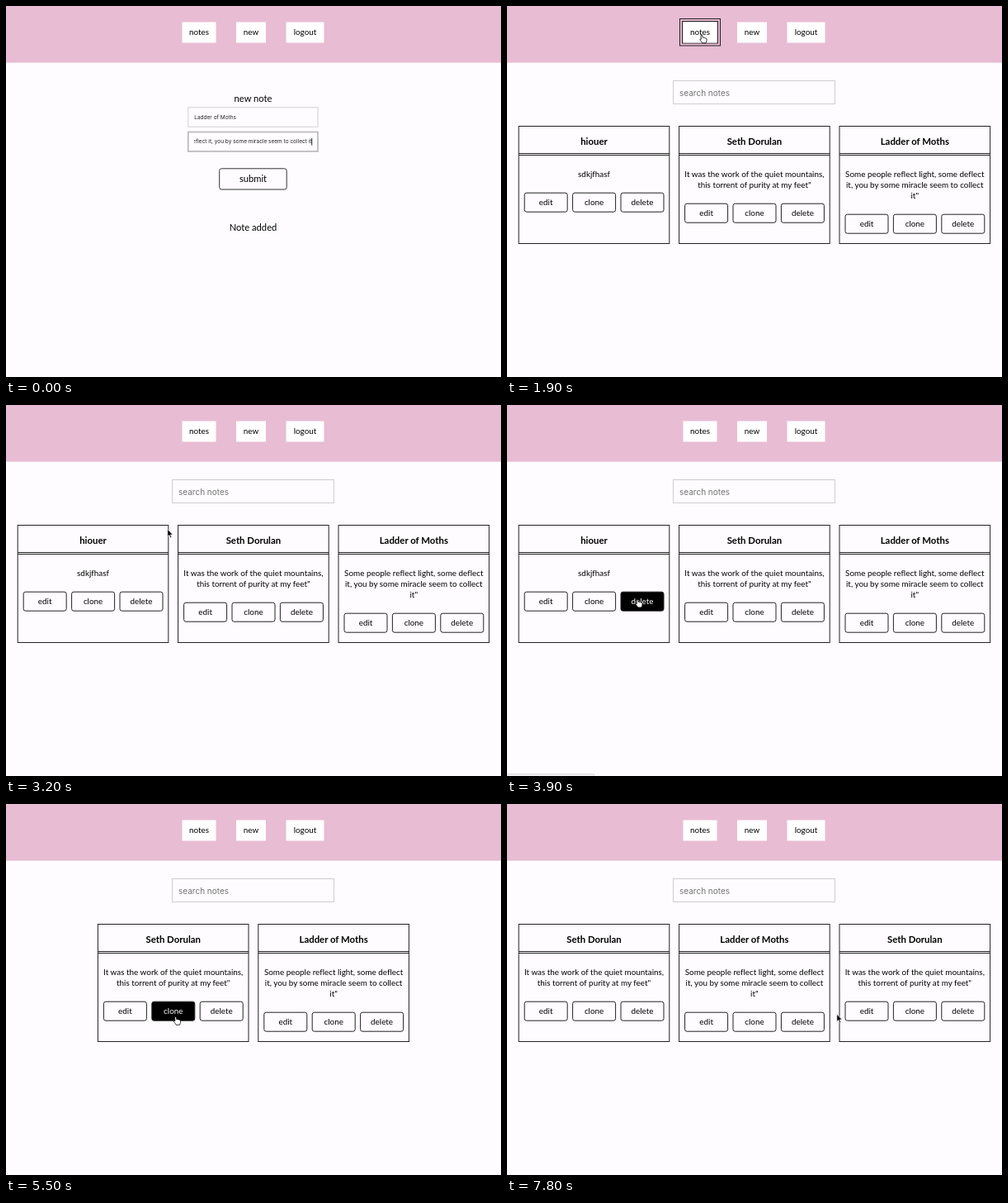
Recreate the animation shown at these times as an HTML page. Size 600 by 449 pixels, loop 8000 ms.

```html
<!DOCTYPE html>
<html lang="en">
<head>
<meta charset="utf-8">
<title>Notes</title>
<style>
  html, body { margin: 0; width: 100%; height: 100%; overflow: hidden; background: #fefcfe; }
  svg { display: block; width: 600px; height: 449px; }
  text { font: 9.9px Lato, "Open Sans", sans-serif; font-variant-ligatures: none; text-anchor: middle; fill: #000; }
  .big { font-size: 11.2px; }
  .title { font-size: 11.4px; font-weight: 700; }
  .field { font: 6.5px Inter, Roboto, sans-serif; text-anchor: start; fill: #222; }
  .end { text-anchor: end; }
  .hint { fill: #8a8a8e; }
  .search { font-size: 10px; fill: #757575; }
</style>
</head>
<body>
<svg id="stage" viewBox="0 0 600 449" xmlns="http://www.w3.org/2000/svg"></svg>
<script>
const LOOP = 8000, STEP = 100;
const stage = document.getElementById('stage');

function add(parent, tag, attrs = {}, content = '') {
  const el = document.createElementNS('http://www.w3.org/2000/svg', tag);
  for (const key in attrs) el.setAttribute(key, attrs[key]);
  el.textContent = content;
  parent.append(el);
  return el;
}
const group = parent => add(parent, 'g');
const label = (parent, x, y, content, cls = '') => add(parent, 'text', { x, y, class: cls }, content);
const box = (parent, x, y, width, height, stroke = 'none', fill = 'none', rx = 0) =>
  add(parent, 'rect', { x, y, width, height, stroke, fill, rx });
const show = (el, on) => { el.style.display = on ? '' : 'none'; };

// Header
box(stage, 0, 0, 600, 68.6, 'none', '#e8bcd3');
const ring = group(stage);
box(ring, 209.5, 15.5, 49, 32.5, '#222');
box(ring, 212.5, 18.5, 43, 26.5, '#222');
for (const [x, w, name] of [[213.5, 41, 'notes'], [279, 36, 'new'], [339.5, 46, 'logout']]) {
  box(stage, x, 19.5, w, 25, 'none', '#fff');
  label(stage, x + w / 2, 35.2, name);
}

// Form for a new note
const form = group(stage);
label(form, 299.5, 115.7, 'new note', 'big');
box(form, 220.8, 122.8, 157.2, 23.4, '#d2d0d4');
const plainEdge = box(form, 220.8, 152.5, 157.2, 23.4, '#d2d0d4');
const focusEdge = box(form, 220.8, 152.5, 157.2, 23.4, '#b9b9be');
focusEdge.setAttribute('stroke-width', 1.7);
box(form, 258.7, 196.8, 81.5, 25.2, '#333', 'none', 2.5);
label(form, 299.5, 213, 'submit', 'big');
label(form, 299.5, 271.5, 'Note added', 'big');

const clip = add(stage, 'clipPath', { id: 'inner' });
box(clip, 228, 155, 144, 18);
const filled = group(form);
label(filled, 228.3, 137, 'Ladder of Moths', 'field');
const typed = add(add(filled, 'g', { 'clip-path': 'url(#inner)' }), 'text',
  { x: 370.3, y: 166.4, class: 'field end' });
const hints = group(form);
label(hints, 228.3, 137, 'Title', 'field hint');
label(hints, 228.3, 166.4, 'Content', 'field hint');
const caret = box(form, 0, 160, 0.9, 8.6, 'none', '#111');

// List of notes
const list = group(stage);
box(list, 201.5, 90.5, 196, 28, '#cfcdd1');
label(list, 209, 108.5, 'search notes', 'field search');

const NOTES = {
  test: ['hiouer', 'sdkjfhasf'],
  quiet: ['Seth Dorulan', 'It was the work of the quiet mountains,', 'this torrent of purity at my feet"'],
  light: ['Ladder of Moths', 'Some people reflect light, some deflect', 'it, you by some miracle seem to collect', 'it"']
};

function button(parent, x, y, name) {
  const g = group(parent);
  const shape = box(g, x, y, 52, 23, '#222', 'none', 2.5);
  const text = label(g, x + 26, y + 14.8, name);
  return on => {
    shape.setAttribute('fill', on ? '#000' : 'none');
    text.style.fill = on ? '#fff' : '';
  };
}

function card(parent, x, [title, ...lines]) {
  const mid = x + 91.3;
  box(parent, x, 145.5, 182.6, 142, '#222');
  label(parent, mid, 168.3, title, 'title');
  for (const y of [178.5, 180.5])
    add(parent, 'path', { d: `M${x} ${y}h182.6`, stroke: '#222' });
  lines.forEach((line, i) => label(parent, mid, 206.8 + 13 * i, line));
  const y = 213.2 + 13 * lines.length;
  return ['edit', 'clone', 'delete'].map((name, i) => button(parent, x + 7 + 58.4 * i, y, name));
}

function board(names) {
  const g = group(list);
  const left = 300 - (names.length * 194.4 - 12) / 2;
  const buttons = names.map((name, i) => card(g, left + 194.4 * i - 0.2, NOTES[name]));
  return { g, buttons };
}
const first = board(['test', 'quiet', 'light']);
const second = board(['quiet', 'light']);
const third = board(['quiet', 'light', 'quiet']);

const status = group(stage);
box(status, -2, 446.6, 107.5, 6, '#dcdadd', '#f1eff1', 1);

// Pointer shapes, hot spot at 0,0
const pointers = {
  arrow: add(stage, 'path', {
    d: 'M0 0V9.2L2.1 7.3L3.5 10.6L5 9.9L3.6 6.8H6.5Z',
    fill: '#000', stroke: '#fff', 'stroke-width': 0.7
  }),
  hand: add(stage, 'path', {
    d: 'M-1 .6Q0-.5 .8 .6L1.3 3.2Q2.3 2.7 2.9 3.5Q3.9 3 4.5 3.8Q5.9 3.6 6 5V7.2L5 9.8H.7Q-.4 7.7-2.2 6Q-2.3 4.7-.6 5.2Z',
    fill: '#fff', stroke: '#000', 'stroke-width': 0.8
  }),
  beam: add(stage, 'path', {
    d: 'M-2-4.8Q0-4.8 0-3.8Q0-4.8 2-4.8M0-3.8V3.8M-2 4.8Q0 4.8 0 3.8Q0 4.8 2 4.8',
    fill: 'none', stroke: '#111', 'stroke-width': 0.8
  })
};

// time, x, y
const PATH = [
  [1000, 274, 108], [1400, 259, 77], [1700, 237, 36], [1900, 236, 35], [2100, 236, 39],
  [2300, 235.7, 55], [2600, 228, 113], [2900, 228, 113], [3000, 224, 121], [3500, 153.5, 194],
  [3600, 153.5, 194], [3900, 158, 235.2], [4400, 158, 235.2], [5200, 204, 262.5],
  [5300, 205, 259], [5500, 205.5, 257.5], [6100, 205.5, 257.5], [6500, 211.5, 309.5],
  [6800, 211.5, 309.5], [6900, 211.7, 309], [7200, 211.7, 309], [7300, 211.5, 309.5],
  [7500, 211.5, 309.5], [7800, 399.8, 254.3], [8000, 399.8, 254.3]
];
// time from which each pointer shape holds
const SHAPES = [
  [0, ''], [1000, 'arrow'], [1700, 'hand'], [2200, 'arrow'], [2500, 'beam'], [3000, 'arrow'],
  [3800, 'hand'], [4400, 'arrow'], [5300, 'hand'], [6100, 'arrow']
];

function position(t) {
  const i = Math.max(1, PATH.findIndex(p => p[0] > t));
  const [t0, x0, y0] = PATH[i - 1], [t1, x1, y1] = PATH[i];
  const k = Math.max(0, (t - t0) / (t1 - t0));
  return [x0 + (x1 - x0) * k, y0 + (y1 - y0) * k];
}

function draw(now) {
  const t = Math.floor(now % LOOP / STEP) * STEP;
  const within = (a, b) => t >= a && t < b;

  show(form, t < 1900);
  show(list, t >= 1900);
  show(ring, within(1800, 2500));
  show(filled, t < 700);
  show(hints, t >= 700);
  show(plainEdge, t >= 1800);
  show(focusEdge, t < 1800);
  show(caret, t < 1800);
  caret.setAttribute('x', t < 700 ? 370.3 : 228);
  typed.textContent = 'some deflect it, you by some miracle seem to collect it' + (t < 100 ? '' : '"');

  show(first.g, t < 4400);
  show(second.g, within(4400, 6100));
  show(third.g, t >= 6100);
  first.buttons[0][2](within(3800, 4400));
  second.buttons[0][1](within(5300, 6100));
  show(status, within(3900, 4400));

  const [x, y] = position(t);
  const shape = SHAPES.filter(s => s[0] <= t).pop()[1];
  for (const name in pointers) {
    show(pointers[name], name === shape);
    pointers[name].setAttribute('transform', `translate(${x} ${y})`);
  }
}

const start = performance.now();
function tick() {
  draw(performance.now() - start);
  requestAnimationFrame(tick);
}
tick();
</script>
</body>
</html>
```
